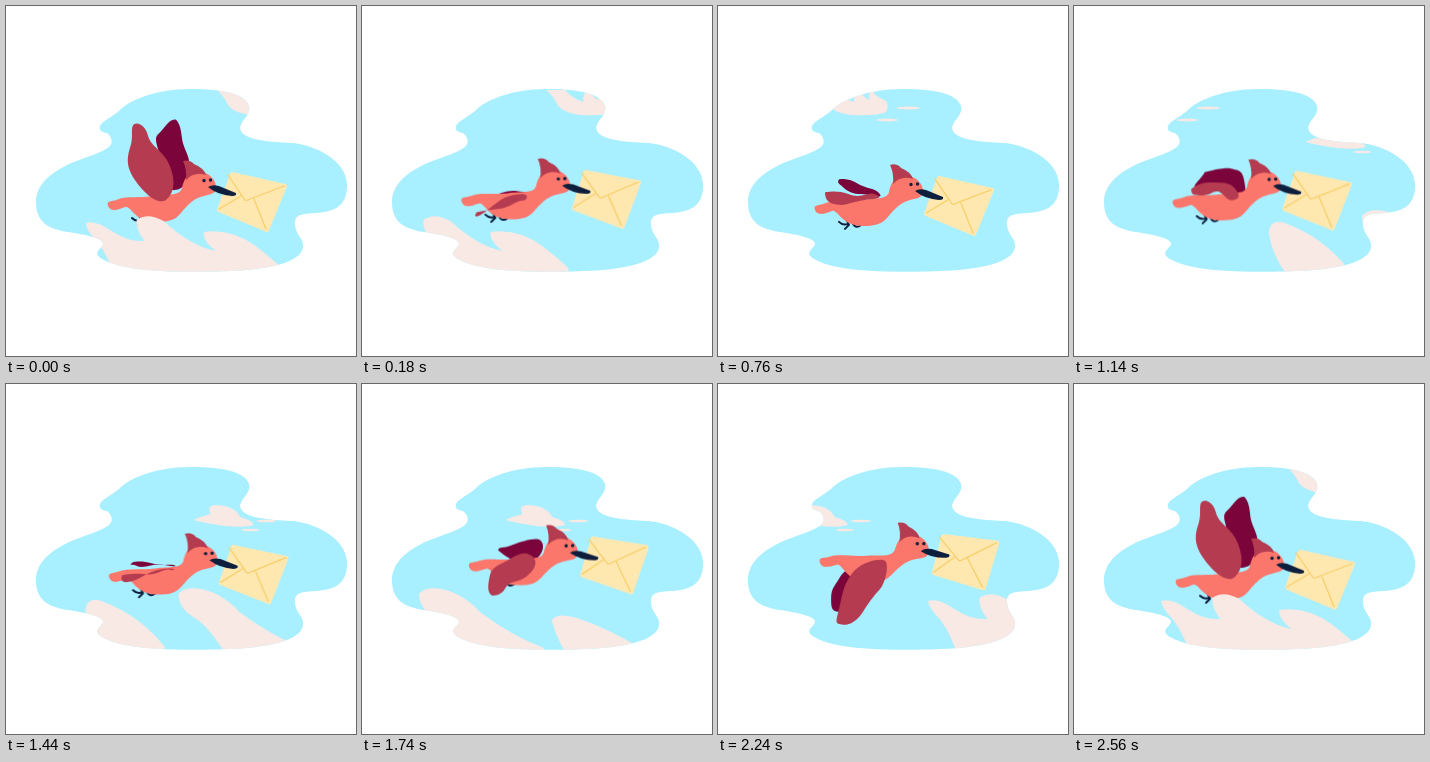
An HTML page without scripts that plays this animation: 350x350 px, repeating every 2.58 s.

```html
<!DOCTYPE html>
<html lang="en">
<head>
<meta charset="utf-8">
<title>Bird carrying a letter</title>
<style>
  @property --lift { syntax: "<number>"; inherits: true; initial-value: 0; }

  html, body { margin: 0; width: 100%; height: 100%; overflow: hidden; background: #fff; }
  svg { display: block; width: 100%; height: 100%; }

  .sky { fill: #a8efff; }
  .cloud { fill: #f8e9e4; }
  .body { fill: #fb766b; }
  .near, .crest { fill: #b53c50; }
  .far { fill: #7b043b; }
  .ink { fill: #0e1f3d; }
  .feet { fill: none; stroke: #0e1f3d; stroke-width: 2; stroke-linecap: round; stroke-linejoin: round; }
  .paper { fill: #ffe8b0; stroke: #ffe8b0; stroke-width: 4; stroke-linejoin: round; }
  .fold { fill: none; stroke: #f6d06b; stroke-width: 1.3; stroke-linecap: round; stroke-linejoin: round; }

  .high { animation: high 2580ms linear infinite; }
  .low { animation: low 2580ms linear infinite; }
  @keyframes high { to { transform: translateX(-379px); } }
  @keyframes low { to { transform: translateX(-993px); } }

  .glide { animation: glide 2580ms linear infinite; }
  @keyframes glide {
    0%, 100% { transform: translate(0, 0); }
    15.5% { transform: translate(-4px, 4px); }
    29.5% { transform: translate(-5px, 4px); }
    44% { transform: translate(-3px, .5px); }
    67.5% { transform: translate(6px, -6.5px); }
    87% { transform: translate(1px, -5px); }
  }

  /* --lift drives the bob and both tilts of every wing beat */
  .bob { transform: translateY(calc(var(--lift) * -10px)); animation: lift 645ms linear infinite; }
  .tilt { transform: rotate(calc(var(--lift) * 4deg)); transform-origin: 195px 178px; }
  .carry { transform: rotate(calc(var(--lift) * -5.5deg)); transform-origin: 214px 184px; }
  @keyframes lift {
    0%, 17.8%, 97%, 100% { --lift: 0; }
    47.3%, 62% { --lift: 1; }
    69.8% { --lift: .65; }
    76.7% { --lift: .15; }
  }

  .near { animation: near 645ms linear infinite; }
  @keyframes near {
    0%, 97%, 100% { d: path("M131 117S139 117 142 129S158 144 164 160S168 186 161 193S140 190 129 174S122 148 125 138S123 117 131 117Z"); }
    17.8% { d: path("M112 182S124 179 136 184S156 181 162 184S168 188 160 189S150 190 142 192S130 196 122 194S112 188 112 182Z"); }
    47.3% { d: path("M126 256S136 256 144 243S158 224 162 219S172 192 164 191S140 194 132 206S124 224 120 240S116 255 126 256Z"); }
    62% { d: path("M130 241S137 242 138 224S152 212 156 203S172 190 166 186S145 182 132 190S118 212 119 220S120 240 130 241Z"); }
    69.8% { d: path("M124 225S133 226 137 218S150 212 158 206S172 190 163 184S146 186 134 192S122 202 121 208S119 222 124 225Z"); }
    76.7% { d: path("M120 185S126 178 140 178S158 178 163 183S170 194 163 195S156 192 150 188S140 191 132 191S120 192 120 185Z"); }
  }

  .far { animation: far 645ms linear infinite; }
  @keyframes far {
    0%, 97%, 100% { d: path("M170 113S175 116 176 130S186 150 183 164S178 184 166 184S156 166 154 152S147 132 153 127S163 112 170 113Z"); }
    17.8% { d: path("M126 169S134 167 144 173S162 178 166 183S166 187 156 185S146 185 140 183S130 177 128 175S124 172 126 169Z"); }
    47.3% { d: path("M122 243S134 240 144 232S168 212 170 200S164 190 158 190S128 196 121 208S112 220 112 231S114 243 122 243Z"); }
    62% { d: path("M120 208S130 208 138 204S155 196 162 190S168 184 162 181S146 178 136 184S120 192 118 198S116 206 120 208Z"); }
    69.8% { d: path("M130 179S142 190 150 190S168 190 172 184S176 172 172 169S154 170 144 174S132 175 130 179Z"); }
    76.7% { d: path("M133 168S152 162 160 164S172 164 174 182S168 186 160 186S150 184 142 184S128 184 124 183S132 172 133 168Z"); }
  }
</style>
</head>
<body>
<svg viewBox="0 0 350 350">
  <defs>
    <path id="blob" d="M94 123C92 116 106 112 114 104S146 83 185 83S240 90 243 100S231 116 235 125S264 136 285 137S340 153 341 178S324 206 310 207S288 208 289 219S298 232 297 241S284 264 210 265.5S112 261 98 254S96 243 97 238S82 229 62 226S30 216 30 196S50 162 76 153S108 140 105 132S95 128 94 123Z"/>
    <clipPath id="window"><use href="#blob"/></clipPath>

    <g id="highClouds">
      <path d="M211 84H230Q236 92 248 96Q246 88 254 84Q256 90 263 94Q262 86 265 83Q268 90 280 95Q284 103 278 107Q268 110 245 109Q228 107 222 99Q218 90 211 84Z"/>
      <ellipse cx="281" cy="114" rx="11" ry="1.4"/>
      <ellipse cx="302" cy="102" rx="12" ry="1.4"/>
      <path d="M399 136Q408 132 416 130Q412 122 420 121Q440 121 446 133Q458 136 459 141Q450 144 430 142Q410 139 399 136Z"/>
      <ellipse cx="472" cy="137" rx="10" ry="1.3"/>
      <ellipse cx="456" cy="146" rx="9" ry="1.3"/>
    </g>

    <path id="ridge" d="M80 217Q90 214 106 225Q122 236 139 235Q130 224 131 214Q142 206 158 215Q185 240 210 245Q197 235 198 226Q225 222 250 240Q268 254 276 262V280H112Q104 252 92 236Q80 224 80 217Z"/>
  </defs>

  <use href="#blob" class="sky"/>

  <g clip-path="url(#window)">
    <g class="cloud high">
      <use href="#highClouds"/>
      <use href="#highClouds" x="379"/>
      <use href="#highClouds" x="-379"/>
    </g>
  </g>

  <g class="glide">
    <g class="bob">
      <path class="feet tilt" d="M133 209L136 215L132 219M126 212Q130 216 135 214M146 209L148 215Q143 219 140 214"/>
      <path class="far"/>
      <g class="tilt">
        <path class="body" d="M102 200C105 207 113 203 119 201S128 216 150 216S172 209 181 200S194 191 205 188S208 166 194 166S178 174 176 182S162 188 148 190S120 190 113 193S100 194 102 200Z"/>
        <path class="crest" d="M177 155Q184 153 188 158Q198 162 200 169Q188 165 180 174Q181 163 177 155Z"/>
        <g class="ink">
          <circle cx="198" cy="174.5" r="1.7"/>
          <circle cx="204.5" cy="174" r="1.7"/>
        </g>
      </g>
      <path class="near"/>
      <g class="carry">
        <path class="paper" d="M226 168L279 180L261 224L213 204Z"/>
        <path class="fold" d="M222 169L239 194Q241 195 244 193L278 180M213 203L235 190M260 223L248 193"/>
        <path class="ink" d="M202 181Q206 178 213 180L230 187Q231 190 226 190Q212 189 202 181Z"/>
      </g>
    </g>
  </g>

  <g clip-path="url(#window)">
    <g class="cloud low">
      <use href="#ridge"/>
      <path d="M634 226Q636 212 650 217Q690 232 714 264L660 280Q636 250 634 226Z"/>
      <path d="M727 210Q733 202 750 205Q772 210 788 228Q820 252 852 264V280H780Q760 245 745 235Q727 225 727 210Z"/>
      <path d="M860 236Q865 228 885 234Q915 244 945 262V280H880Q862 250 860 236Z"/>
      <use href="#ridge" x="993"/>
    </g>
  </g>
</svg>
</body>
</html>
```
